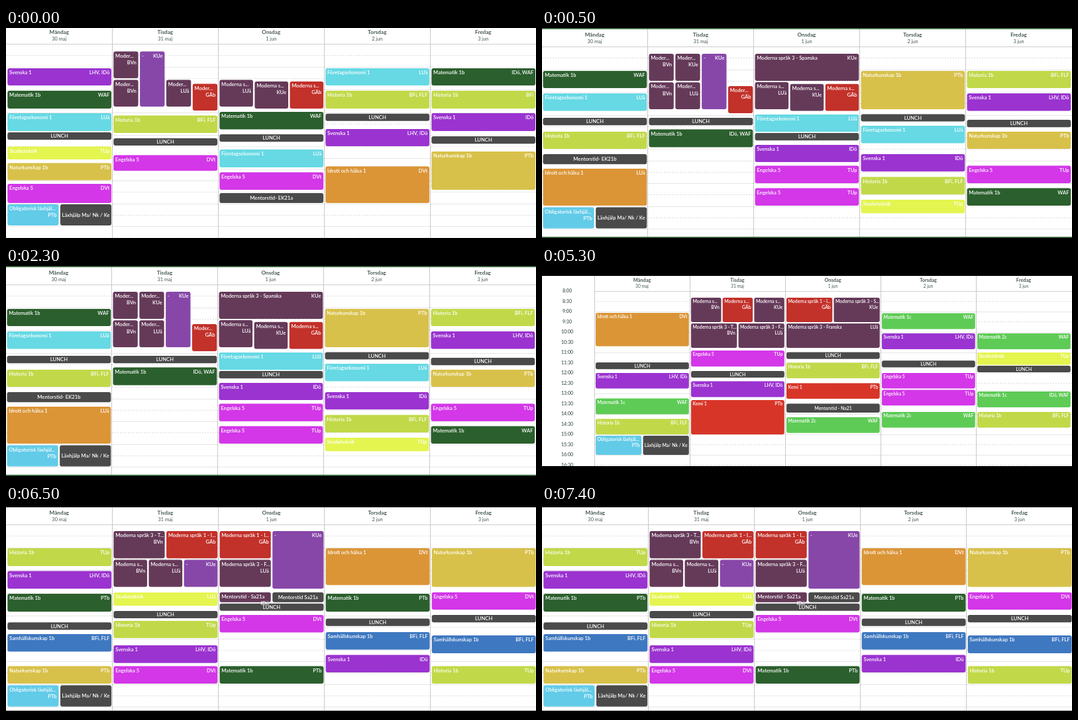
Animation of 800 by 318 pixels, one loop 8000 ms. Source, as an HTML page:

```html
<!DOCTYPE html>
<html lang="sv">
<head>
<meta charset="utf-8">
<title>Schema</title>
<style>
  html, body { margin: 0; width: 100%; height: 100%; overflow: hidden; background: #fff; }
  #stage { position: relative; width: 800px; height: 318px; overflow: hidden; }
  #weeks { position: absolute; left: 0; top: 0; display: block; animation: flip 8s step-end infinite; }
  text { font-family: Lato, "Open Sans", sans-serif; font-weight: 600; fill: #fff; }
  .head { font-weight: 700; fill: #45594f; }
  .date { font-weight: 400; fill: #45594f; }
  .hour { font-weight: 600; fill: #45594f; }
  .mid { text-anchor: middle; }
  .end { text-anchor: end; }
  @keyframes flip {
    0% { transform: translateY(0); }
    6.25% { transform: translateY(-318px); }
    43.75% { transform: translateY(-636px); }
    81.25%, 100% { transform: translateY(-954px); }
  }
</style>
</head>
<body>
<div id="stage"><svg id="weeks" width="800" height="1272"></svg></div>
<script>
const W = 800, H = 318;
const plum = '#653a59', red = '#c2312a', gray = '#4a4a4a', lime = '#5ecb56';

// key: [title, colour]
const subjects = {
  sv: ['Svenska 1', '#9b33d0'],
  ma: ['Matematik 1b', '#2b5f2d'],
  m1: ['Matematik 1c', lime],
  m2: ['Matematik 2c', lime],
  fe: ['Företagsekonomi 1', '#66d9e4'],
  st: ['Studieteknik', '#e4f550'],
  na: ['Naturkunskap 1b', '#d8c14a'],
  sa: ['Samhällskunskap 1b', '#3e78c0'],
  en: ['Engelska 5', '#d337e8'],
  hi: ['Historia 1b', '#c1d948'],
  id: ['Idrott och hälsa 1', '#db9537'],
  ke: ['Kemi 1', '#d83529'],
  ob: ['Obligatorisk läxhjäl...', '#62cbe8'],
  vi: ['-', '#8747a8'],
  p4: ['Moder...', plum],
  p3: ['Moderna s...', plum],
  pT: ['Moderna språk 3 - T...', plum],
  pF: ['Moderna språk 3 - F...', plum],
  pS: ['Moderna språk 3 - S...', plum],
  fr: ['Moderna språk 3 - Franska', plum],
  sp: ['Moderna språk 3 - Spanska', plum],
  mp: ['Mentorstid - Sa21a', plum],
  r4: ['Moder...', red],
  r3: ['Moderna s...', red],
  rI: ['Moderna språk 1 - I...', red],
  lu: ['LUNCH', gray],
  lx: ['Läxhjälp Ma/ Nk / Ke', gray],
  ea: ['Mentorstid- EK21a', gray],
  eb: ['Mentorstid- EK21b', gray],
  n2: ['Mentorstid - Na21', gray],
  s2: ['Mentorstid Sa21a', gray]
};

// One line per day; each lesson: key, top, bottom, [part/of], teachers
const weeks = [
  { x: 0.3, col: 160, top: 24.5, k: 1, bars: [], days: `
sv 61 87 LHV, IDö; ma 95 122 WAF; fe 129 156 LUä; lu 158 169.3; st 179.5 199 TUp; na 204.5 230.5 PTb; en 236 265 DVt; ob 267 299 0/2 PTb; lx 267 299 1/2
p4 35.5 76 0/4 BVn; p4 78.5 119 0/4 BVn; vi 35.5 119 1/4 KUe; p4 78.5 119 2/4 LUä; r4 84.5 125 3/4 GÄb; hi 132.5 159 BFi, FLF; lu 167 178; en 192.5 216.3 DVt
p3 78.5 119 0/3 LUä; p3 81 122 1/3 KUe; r3 81 122 2/3 GÄb; ma 127 153.5 WAF; lu 161 172.3; fe 184 211 LUä; en 218.5 245 DVt; ea 250 265
fe 61 87 LUä; hi 95 122 BFi, FLF; lu 129.7 140.7; sv 153 179 LHV, IDö; id 209.5 265 DVt
ma 61 87 IDö, WAF; hi 95 122 BFi; sv 129 156 IDö; lu 164 175.3; na 187 245 PTb` },

  { x: -0.5, col: 160, top: 28.5, k: 1, bars: [[0, 1.7, '#2b5c2e'], [316.2, 1.8, '#2b5c2e']], days: `
ma 65 91 WAF; fe 99 125.5 LUä; lu 136 147.3; hi 157 183 BFi, FLF; eb 191 206.3; id 213 269 LUä; ob 271.5 303.5 0/2 PTb; lx 271.5 303.5 1/2
p4 39 80 0/4 BVn; p4 39 80 1/4 KUe; vi 39 123 2/4 KUe; p4 82.3 123 0/4 BVn; p4 82.3 123 1/4 LUä; r4 88 129 3/4 GÄb; lu 136 147.3; ma 153.5 180.5 IDö, WAF
sp 39 80 KUe; p3 82 123 0/3 LUä; p3 84.7 125.5 1/3 KUe; r3 84.7 125.5 2/3 GÄb; fe 131 157.3 LUä; lu 159 170.3; sv 177 203 IDö; en 208.5 235 TUp; en 242.5 269 TUp
na 65 123 PTb; lu 130.5 141.5; fe 148 174.5 LUä; sv 191 217.3 IDö; hi 225.5 252 BFi, FLF; st 260 280.5 TUp
hi 65 91 BFi, FLF; sv 99 125.5 LHV, IDö; lu 139 150.3; na 157 183 PTb; en 208.5 235 TUp; ma 242.5 269 WAF` },

  { x: 79, col: 144, top: 38, k: 0.9, hours: true, bars: [[0, 15, '#000'], [303, 15, '#000']], days: `
id 71 121.5 DVt; lu 146 156.3; sv 162 185.5 LHV, IDö; m1 200.5 224.5 WAF; hi 231.5 255 BFi, FLF; ob 257 286 0/2 PTb; lx 257 286 1/2
p3 48 85 0/3 BVn; r3 48 85 1/3 GÄb; p3 48 85 2/3 KUe; pT 87 124 0/2 BVn; pF 87 124 1/2 LUä; en 128 152.3 TUp; lu 159 169; sv 174.5 198.5 LHV, IDö; ke 203 255 PTb
rI 48 85 0/2 GÄb; pS 48 85 1/2 KUe; fr 87 124 LUä; lu 130.5 140.7; hi 146.5 170 BFi, FLF; ke 177.5 201 PTb; n2 208.5 222; m2 229 252.7 WAF
m1 71.5 95.5 WAF; sv 102 126 LHV, IDö; lu 143.3 153.5; en 162 185.5 TUp; en 187.5 211.3 TUp; m2 221 244.7 WAF
m2 102 126 WAF; st 131 149.7 TUp; lu 151 161; m1 190 214 IDö, WAF; hi 221 244.7 BFi, FLF` },

  { x: 0.3, col: 160.1, top: 31.5, k: 1, bars: [[0, 5, '#000'], [313, 5, '#000']], days: `
hi 67 94 TUp; sv 101.5 128.3 LHV, IDö; ma 136 163 PTb; lu 179.3 190.5; sa 197 223.5 BFi, FLF; na 245.5 272 PTb; ob 274.5 306.7 0/2 PTb; lx 274.5 306.7 1/2
pT 41 82.3 0/2 BVn; rI 41 82.3 1/2 GÄb; p3 84.5 125.5 0/3 BVn; p3 84.5 125.5 1/3 LUä; vi 84.5 125.5 2/3 KUe; st 134 154 LUä; lu 162 173; hi 177 203 TUp; sv 214 240.7 LHV, IDö; en 245.5 272 DVt
rI 41 82.3 0/2 GÄb; vi 41 128.3 1/2 KUe; pF 84.5 125.5 0/2 LUä; lu 150.7 161.7; mp 133.7 148.7 0/2 IDö; s2 133.7 148.7 1/2; en 168 194.5 DVt; ma 245.5 272 PTb
id 67 122.7 DVt; ma 136 163 PTb; lu 173.5 184.7; sa 194 220.5 BFi, FLF; sv 228.5 255 IDö
na 67 125.5 PTb; en 133.7 160 DVt; lu 168 179.3; sa 199 226 BFi, FLF; hi 245.5 272 TUp` }
];

const names = ['Måndag', 'Tisdag', 'Onsdag', 'Torsdag', 'Fredag'];
const dates = ['30 maj', '31 maj', '1 jun', '2 jun', '3 jun'];

function add(parent, tag, attrs, text) {
  const el = document.createElementNS('http://www.w3.org/2000/svg', tag);
  for (const a in attrs) el.setAttribute(a, attrs[a]);
  if (text) el.textContent = text;
  return parent.appendChild(el);
}

function label(g, x, y, size, cls, text) {
  add(g, 'text', { x, y, 'font-size': size, class: cls }, text);
}

function line(g, x1, y1, x2, y2, stroke, dash = 'none') {
  add(g, 'line', { x1, y1, x2, y2, stroke, 'stroke-dasharray': dash });
}

function drawGrid(g, { x, col, top, k, hours }) {
  const step = 17.25 * k;
  for (let i = 1; i < 18; i++) {
    const y = Math.floor(top + i * step) + 0.5;
    line(g, Math.max(0, x), y, W, y, i % 2 ? '#dcdcdc' : '#e6e6e6', i % 2 ? '2 2' : 'none');
  }
  const y0 = Math.floor(top) + 0.5;
  line(g, Math.max(0, x), y0, W, y0, '#cfcfcf');
  for (let d = hours ? 0 : 1; d < 5; d++) {
    const lx = Math.floor(x + d * col) + 0.5;
    line(g, lx, 0, lx, H, '#c8c8c8');
  }
  if (!hours) return;
  for (let i = 0; i < 18; i++) {
    const time = 8 + (i >> 1) + (i % 2 ? ':30' : ':00');
    label(g, 38, top + 2 + i * step, 7, 'hour mid', time);
  }
}

function drawLesson(g, entry, left, width, k) {
  const [, key, t, b, part, of, who] =
    entry.trim().match(/^(\w+) ([\d.]+) ([\d.]+)(?: (\d)\/(\d))? ?(.*)$/);
  const [title, fill] = subjects[key];
  const y = +t, h = b - t, gap = 2.5 * k, size = 7.65 * k, pad = 2.8 * k;
  const pitch = (width + gap) / (of || 1);
  const x = left + (part || 0) * pitch, w = pitch - gap;

  add(g, 'rect', { x, y, width: w, height: h, rx: 3 * k, fill });
  if (fill === gray) {
    label(g, x + w / 2, y + h / 2 + 2.8 * k, size, 'mid', title);
    return;
  }
  const base = y + 9 * k;
  const second = of && title !== '-';
  label(g, x + pad, base, size, '', title);
  label(g, x + w - pad, base + (second ? 10.4 * k : 0), size, 'end', who);
}

function drawWeek(week, i) {
  const g = add(document.getElementById('weeks'), 'svg', { y: i * H, width: W, height: H });
  const { x, col, top, k } = week;
  add(g, 'rect', { width: W, height: H, fill: '#fff' });
  drawGrid(g, week);
  week.days.trim().split('\n').forEach((day, d) => {
    const left = x + d * col, mid = left + col / 2;
    label(g, mid, top - 15.2 * k, 8.2 * k, 'head mid', names[d]);
    label(g, mid, top - 5.2 * k, 7.4 * k, 'date mid', dates[d]);
    day.split(';').forEach(e => drawLesson(g, e, left + 2, col - 3.2, k));
  });
  for (const [y, height, fill] of week.bars) add(g, 'rect', { y, width: W, height, fill });
}

weeks.forEach(drawWeek);
</script>
</body>
</html>
```
